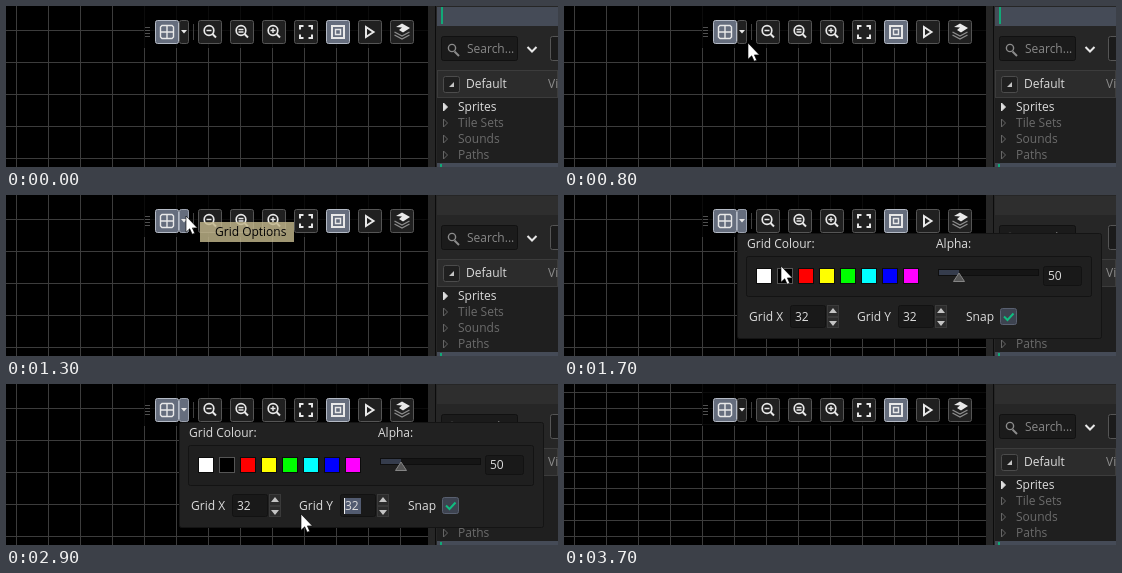
Animation of 552x161 px, one loop 4.2 s. Source, as an HTML page:

```html
<!DOCTYPE html>
<html lang="en">
<head>
<meta charset="utf-8">
<title>Grid options</title>
<style>
html, body { margin: 0; width: 100%; height: 100%; overflow: hidden; background: #000; }
svg { display: block; width: 552px; height: 161px; }
text { font: 12px "Open Sans", sans-serif; fill: #dcdcdc; white-space: pre; }
rect { shape-rendering: crispEdges; }
.dim { fill: #6c6c6c; }
.line { fill: none; stroke: #e8e8e8; stroke-width: 1.4; }
.bold { stroke-width: 2; }
.gray { stroke: #8c8c8c; }
</style>
</head>
<body>
<svg viewBox="0 0 552 161">
  <path id="grid" stroke="#3c3c3c" shape-rendering="crispEdges"/>
  <rect x="138" width="284" height="42" opacity=".8"/>
  <g id="panel"></g>
  <g id="bar"></g>
  <g id="tip">
    <rect x="194" y="27" width="94" height="20" fill="#c3b78c"/>
    <text x="209" y="41" style="fill:#000">Grid Options</text>
  </g>
  <g id="popup"></g>
  <path id="cursor" d="M0 0V16.2L3.7 12.8 6.2 18.2 8.7 17.2 6.4 11.9H11.4Z" fill="#fff" stroke="#000" stroke-width=".6"/>
</svg>
<script>
const $ = id => document.getElementById(id);
const box = (x, y, w, h, fill, stroke, r = 0) => stroke
  ? `<rect x="${x + .5}" y="${y + .5}" width="${w - 1}" height="${h - 1}" rx="${r}" fill="${fill}" stroke="${stroke}" ${r ? 'style="shape-rendering:auto"' : ''}/>`
  : `<rect x="${x}" y="${y}" width="${w}" height="${h}" fill="${fill}"/>`;
const label = (x, y, s, extra = '') => `<text x="${x}" y="${y}" ${extra}>${s}</text>`;
const shape = (d, fill = '#e8e8e8') => `<path d="${d}" fill="${fill}"/>`;
const line = (d, style = '') => `<path class="line ${style}" d="${d}"/>`;

function drawPanel() {
  const rows = ['Sprites', 'Tile Sets', 'Sounds', 'Paths'];
  $('panel').innerHTML =
    box(422, 0, 130, 161, '#262626') + box(429, 0, 1, 161, '#0c0c0c') +
    box(431, 1, 121, 19, '#2e2e2e') +
    `<g id="focus">${box(431, 1, 121, 19, '#454b57')}${box(435, 1, 2, 17, '#12a877')}</g>` +
    box(435, 30, 77, 25, '#1b1b1b', '#111', 2) +
    line('M448.5 45.5L453 50', 'gray bold') + '<circle class="line gray" cx="446" cy="42" r="3.6"/>' +
    label(461, 47, 'Search...', 'style="fill:#888"') +
    line('M521.5 41L526 45.5 530.5 41', 'bold') +
    box(544, 30, 20, 25, '#1b1b1b', '#555', 2) +
    box(431, 64, 121, 28, '#2c2c2c', '#3c3c3c') +
    box(437, 70, 17, 17, '#202020', '#4c4c4c', 2) + shape('M443 81H448V76Z', '#c4c4c4') +
    label(460, 82, 'Default') + label(542, 82, 'View', 'style="fill:#8c8c8c"') +
    box(431, 92, 121, 65, '#1f1f1f') +
    rows.map((s, i) => {
      const y = 101 + 16 * i;
      return `<path d="M437.5 ${y - 4}V${y + 4}L441.5 ${y}Z" fill="${i ? 'none' : '#ddd'}" stroke="${i ? '#666' : '#ddd'}"/>` +
        label(452, y + 4, s, i ? 'class="dim"' : '');
    }).join('') +
    box(431, 157, 121, 4, '#454b57') + box(434, 158, 2, 3, '#12a877');
}

function drawBar() {
  const lens = x => `<circle class="line" cx="${x - 1}" cy="24.5" r="4.8" style="stroke-width:1.7"/>` + line(`M${x + 2.5} 28L${x + 6} 31.5`, 'bold');
  const button = (x, on) => box(x, 14, 24, 24, on ? '#656d7d' : '#202020', on ? '#b4bac5' : '#555', 2);
  $('bar').innerHTML =
    [21, 24, 27, 30].map(y => box(139, y, 5, 1, '#505050')).join('') +
    box(187, 18, 1, 16, '#404040') +
    box(173, 14, 10, 24, '#202020', '#555', 2) +
    `<g id="drop">${box(173, 14, 10, 24, '#656d7d', '#9ca3b0', 2)}</g>` +
    shape('M175 24H181L178 27.5Z') +
    button(149, true) + line('M156 19.5H166L167.5 21V31L166 32.5H156L154.5 31V21ZM161 19.5V32.5M154.5 26H167.5') +
    [192, 224, 256, 288, 352, 384].map(x => button(x)).join('') + button(320, true) +
    [204, 236, 268].map(lens).join('') +
    line('M200.5 24.5H205.5M232.5 23.5H237.5M232.5 26H237.5M264.5 24.5H269.5M267 22V27') +
    line('M294 23.5V20H297.5M302.5 20H306V23.5M306 28.5V32H302.5M297.5 32H294V28.5', 'bold') +
    line('M326 20H338V32H326Z', 'bold') + line('M329.5 23.5H334.5V28.5H329.5Z') +
    line('M360 21V31L367.5 26Z', 'bold') +
    line('M388.5 26L396 30 403.5 26M388.5 29L396 33 403.5 29', 'gray') +
    shape('M390 21L396 17.5 404 22 397 26.5 393 24 396 21.5Z');
}

function drawPopup() {
  const colours = ['#fff', '#000', '#f00', '#ff0', '#0f0', '#0ff', '#00f', '#f0f'];
  const field = x => box(x, 110, 36, 23, '#191919', '#121212', 2) +
    box(x + 37, 110, 12, 12, '#2c2c2c', '#3a3a3a') + box(x + 37, 122, 12, 11, '#2c2c2c', '#3a3a3a') +
    shape(`M${x + 39} 118H${x + 47}L${x + 43} 113ZM${x + 39} 126H${x + 47}L${x + 43} 131Z`, '#c4c4c4');
  $('popup').innerHTML =
    box(173, 38, 365, 106, '#212121', '#141414', 2) +
    label(183, 53, 'Grid Colour:') + label(372, 53, 'Alpha:') +
    box(182, 61, 346, 41, '#1f1f1f', '#131313', 2) +
    colours.map((c, i) => box(192 + 21 * i, 73, 16, 16, c, i == 1 ? '#555' : '#0c0c0c')).join('') +
    box(374, 74, 101, 7, '#151515', '#0e0e0e') + box(375, 75, 20, 5, '#353c4c') +
    `<path d="M389.5 86.5H400.5L395 78Z" fill="#555" stroke="#858585"/>` +
    box(479, 71, 39, 20, '#191919', '#121212', 2) + label(484, 85, '50') +
    label(185, 126, 'Grid X') + field(226) + label(231, 126, '32') +
    label(293, 126, 'Grid Y') + field(334) +
    `<g id="select">${box(338, 114, 17, 16, '#525b70')}${box(338, 114, 1, 16, '#eee')}</g>` +
    label(339, 126, '', 'id="gridY"') +
    label(402, 126, 'Snap') + box(436, 113, 17, 17, '#3d4350', '#596070', 2) +
    '<path class="bold" d="M440 121.5L443.5 125 449.5 118.5" fill="none" stroke="#10bd80"/>';
}

// pointer: time, x, y
const track = [
  [100, 166, 141], [300, 173, 112], [600, 181, 66], [800, 184, 37], [1100, 180, 21],
  [1400, 180, 21], [1700, 217, 71], [1800, 232, 81], [2300, 346, 114], [2600, 346, 114],
  [2900, 295, 130], [3000, 295, 130], [3100, 296, 136]
];

function pointer(t) {
  const i = Math.max(1, track.findIndex(k => k[0] >= t));
  const [a, b] = [track[i - 1], track[i]];
  const p = (t - a[0]) / (b[0] - a[0]);
  return [1, 2].map(n => Math.round(a[n] + (b[n] - a[n]) * p));
}

function drawGrid(step) {
  let d = '';
  for (let x = 10; x < 422; x += 32) d += `M${x + .5} 0V161`;
  for (let y = 24 % step; y < 161; y += step) d += `M0 ${y + .5}H422`;
  $('grid').setAttribute('d', d);
}

const show = (id, on) => $(id).style.display = on ? '' : 'none';

function render(t) {
  const open = t >= 1400 && t < 3700;
  drawGrid(t >= 3500 ? 16 : 32);
  show('focus', t < 1100);
  show('drop', t >= 1100 && t < 3700);
  show('popup', open);
  show('tip', t >= 1100 && t < 1400);
  $('tip').style.opacity = Math.min(1, .25 + (t - 1100) / 350);
  show('select', t >= 2500 && t < 3200);
  $('gridY').textContent = t < 3200 ? '32' : t < 3400 ? '1' : '16';
  const seen = t >= 100 && t <= 3100;
  show('cursor', seen);
  if (seen) $('cursor').setAttribute('transform', `translate(${pointer(t)})`);
}

drawPanel();
drawBar();
drawPopup();
const start = performance.now();
function tick() {
  const t = (performance.now() - start) % 4200;
  render(Math.min(3700, Math.floor(t / 100) * 100));
  requestAnimationFrame(tick);
}
render(0);
requestAnimationFrame(tick);
</script>
</body>
</html>
```
